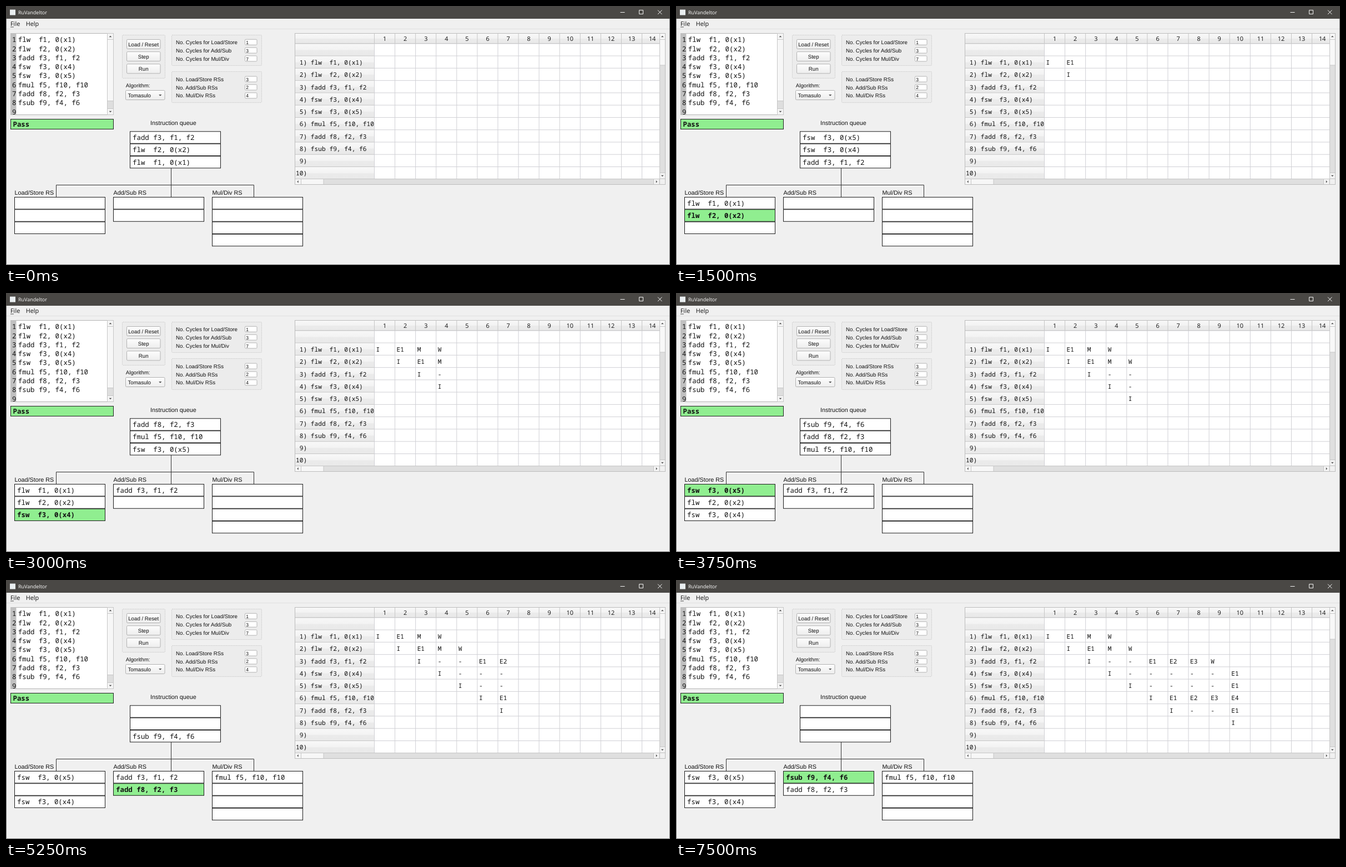
Animation of 1196x468 px, one loop 8000 ms. Source, as an HTML page:

```html
<!DOCTYPE html>
<html lang="en">
<head>
<meta charset="utf-8">
<title>Pipeline simulator</title>
<style>
  html, body { margin: 0; width: 100%; height: 100%; overflow: hidden; background: #f0f0f0; }
  svg { display: block; width: 1196px; height: 468px; }
  text { white-space: pre; text-rendering: geometricPrecision; fill: #111; }
  .mono { font-family: "Noto Sans Mono", "DejaVu Sans Mono", monospace; font-size: 12.38px; }
  .cell { font-family: "Noto Sans Mono", "DejaVu Sans Mono", monospace; font-size: 11.2px; }
  .ui { font-family: "Liberation Sans", Arial, sans-serif; font-size: 9.7px; }
  .label { font-family: "Liberation Sans", Arial, sans-serif; font-size: 10.8px; }
  .menu { font-family: "Open Sans", "Noto Sans", sans-serif; font-size: 10.9px; }
  .title { font-family: "Open Sans", "Noto Sans", sans-serif; font-size: 9px; fill: #fff; }
  .bold { font-weight: 700; }
  .mid { text-anchor: middle; }
</style>
</head>
<body>
<svg id="stage" viewBox="0 0 1196 468" xmlns="http://www.w3.org/2000/svg">
  <defs>
    <linearGradient id="raised" x1="0" y1="0" x2="0" y2="1">
      <stop offset="0" stop-color="#fdfdfd"/><stop offset="1" stop-color="#ededed"/>
    </linearGradient>
    <linearGradient id="head" x1="0" y1="0" x2="0" y2="1">
      <stop offset="0" stop-color="#f8f8f8"/><stop offset=".5" stop-color="#f3f3f3"/>
      <stop offset=".55" stop-color="#ebebeb"/><stop offset="1" stop-color="#e9e9e9"/>
    </linearGradient>
    <clipPath id="codeClip"><rect x="8" y="49" width="174" height="147"/></clipPath>
    <clipPath id="rowClip"><rect x="520" y="49" width="143" height="263"/></clipPath>
  </defs>
  <g id="base"></g>
  <g id="live"></g>
</svg>
<script>
const STEP = 750, LOOP = 8000, LAST = 10;
const PITCH = 22.27, COL = 37.08;
const GREEN = '#90ee90';

const program = [
  'flw  f1, 0(x1)', 'flw  f2, 0(x2)', 'fadd f3, f1, f2', 'fsw  f3, 0(x4)',
  'fsw  f3, 0(x5)', 'fmul f5, f10, f10', 'fadd f8, f2, f3', 'fsub f9, f4, f6'
];

// Issue cycle, station, slot and the stages that follow, per instruction
const runs = [
  { at: 1, rs: 0, slot: 0, stages: 'I E1 M W' },
  { at: 2, rs: 0, slot: 1, stages: 'I E1 M W' },
  { at: 3, rs: 1, slot: 0, stages: 'I - - E1 E2 E3 W' },
  { at: 4, rs: 0, slot: 2, stages: 'I - - - - - E1' },
  { at: 5, rs: 0, slot: 0, stages: 'I - - - - E1' },
  { at: 6, rs: 2, slot: 0, stages: 'I E1 E2 E3 E4' },
  { at: 7, rs: 1, slot: 1, stages: 'I - - E1' },
  { at: 10, rs: 1, slot: 0, stages: 'I' }
].map(r => ({ ...r, stages: r.stages.split(' ') }));

const stations = [
  { name: 'Load/Store RS', x: 15.5, size: 3 },
  { name: 'Add/Sub RS', x: 193.5, size: 2 },
  { name: 'Mul/Div RS', x: 371.5, size: 4 }
];

const rect = (x, y, w, h, fill, stroke = 'none', extra = '') =>
  `<rect x="${x}" y="${y}" width="${w}" height="${h}" fill="${fill}" stroke="${stroke}" ${extra}/>`;
const path = (d, stroke, extra = '') => `<path d="${d}" fill="none" stroke="${stroke}" ${extra}/>`;
const text = (x, y, cls, s) => `<text x="${x}" y="${y}" class="${cls}">${s}</text>`;

function arrow(x, y, dir, r = 2.4) {
  return `<path d="M${-r} ${r / 2}L0 ${-r / 2}L${r} ${r / 2}z" fill="#505050"
    transform="translate(${x} ${y}) rotate(${dir * 90})"/>`;
}

function windowFrame() {
  return rect(0, 0, 1196, 468, '#f0f0f0') +
    rect(0, 0, 1196, 23, '#4a4845') +
    path('M.5 23V467.5H1195.5V23', '#6b6b6b') +
    rect(7, 6.5, 10, 10, '#e9eef0') +
    text(22, 14.8, 'title', 'RuVandeltor') +
    path('M1106.5 11.5H1114.5M1140.5 7.5H1147.5V14.5H1140.5zM1174 7.5L1181.5 15M1181.5 7.5L1174 15', '#f4f4f4') +
    text(8, 36.3, 'menu', 'File') + text(35.7, 36.3, 'menu', 'Help') +
    path('M8 38H14', '#222', 'stroke-width=".8"') +
    path('M1 41.5H1195', '#e0e0e0');
}

function editor() {
  let s = rect(8.5, 49.5, 185, 147, '#fff', '#b4b4b4') + rect(8, 49, 10.5, 147.5, '#c0c0c0');
  s += '<g clip-path="url(#codeClip)">';
  for (let i = 0; i < 9; i++) {
    const y = 65.4 + i * 16.27;
    s += text(10.9, y, 'mono', i + 1) + text(21.8, y, 'mono', program[i] || '');
  }
  return s + '</g>' +
    rect(182.5, 49.5, 11, 147, '#f4f4f4', '#c6c6c6') +
    rect(182.5, 60.5, 11, 111, '#f7f7f7', '#c6c6c6') +
    rect(183, 172, 10, 13.5, '#dedede') + path('M182.5 185.5H193.5', '#c6c6c6') +
    arrow(188, 55, 0) + arrow(188, 191, 2) +
    rect(8.5, 204.5, 185, 18, GREEN, '#222') + text(12.5, 218.1, 'mono bold', 'Pass');
}

function controls() {
  const group = (x, y, w, h) => rect(x, y, w, h, '#ececec', '#cfcfcf', 'rx="1.5" stroke-dasharray="2 1"');
  let s = group(209.5, 52.5, 77, 78) + group(298.5, 52.5, 162, 55) + group(298.5, 118.5, 162, 56);
  ['Load / Reset', 'Step', 'Run'].forEach((name, i) => {
    const y = 60.5 + i * 22.2;
    s += rect(217.5, y, 60.5, 17, 'url(#raised)', '#b2b2b2', 'rx="1.8"') +
      text(247.7, y + 12.2, 'ui mid', name);
  });
  s += text(215.8, 147.3, 'ui', 'Algorithm:') +
    rect(215.5, 152.5, 70.5, 17, 'url(#raised)', '#b2b2b2', 'rx="1.8"') +
    text(219.5, 164.9, 'ui', 'Tomasulo') + arrow(277.8, 161.3, 2, 2.7);
  const field = (y, name, value) => text(306, y, 'ui', name) +
    rect(430.5, y - 8.6, 21.5, 10, '#fff', '#b4b4b4', 'rx="1.6"') +
    `<text x="432.3" y="${y - .1}" class="ui" style="font-size:8.6px">${value}</text>`;
  [['Load/Store', 1, 3], ['Add/Sub', 3, 2], ['Mul/Div', 7, 4]].forEach(([unit, cycles, size], i) => {
    s += field(68.9 + i * 14.85, `No. Cycles for ${unit}`, cycles) +
      field(135.7 + i * 14.85, `No. ${unit} RSs`, size);
  });
  return s;
}

function diagram() {
  return text(260, 215, 'label', 'Instruction queue') +
    path('M297.5 293V345M90.5 345V323.5H446.5V345', '#333') +
    stations.map(st => text(st.x, 340.7, 'label', st.name)).join('');
}

function table() {
  const left = 663.5, right = 1177, top = 67.8, bottom = 312;
  let s = rect(520, 49, 667, 273, '#f0f0f0') + rect(left, top, right - left, bottom - top, '#fff') +
    rect(520, 49, 657, top - 49, 'url(#head)');
  let grid = '', heads = '';
  for (let c = 0; c < 14; c++) {
    const x = left + c * COL;
    grid += `M${x} ${top}V${bottom}`;
    heads += `M${x} 49V${top}`;
    s += text(x + 18.6, 63.4, 'menu mid', c + 1);
  }
  s += '<g clip-path="url(#rowClip)">';
  for (let r = 0; r < 11; r++) {
    const y = top + r * PITCH;
    s += rect(520, y, 143.5, PITCH, 'url(#head)');
    grid += `M${left} ${y}H${right}`;
    heads += `M520 ${y}H${left}`;
    if (r) s += text(522, y + 15.9, 'cell', `${r})`.padStart(3) + ' ' + (program[r - 1] || ''));
  }
  s += '</g>' + path(grid, '#d0d0d5') + path(heads, '#c6c6c6') + path(`M520 ${top}H${right}`, '#c6c6c6');
  return s +
    rect(1177.5, 49.5, 10, 262.5, '#dfdfdf', '#c6c6c6') +
    rect(1177.5, 49.5, 10, 57.5, '#f7f7f7', '#c6c6c6') + path('M1177.5 60.5H1187.5', '#c6c6c6') +
    rect(1177.5, 301.5, 10, 10.5, '#f4f4f4', '#c6c6c6') +
    arrow(1182.3, 55, 0) + arrow(1182.3, 307, 2) +
    rect(520.5, 312.5, 657, 10, '#dfdfdf', '#c6c6c6') +
    rect(520.5, 312.5, 51.5, 10, '#f7f7f7', '#c6c6c6') + path('M531.5 312.5V322.5', '#c6c6c6') +
    rect(1166.5, 312.5, 10.5, 10, '#f4f4f4', '#c6c6c6') +
    arrow(525.5, 317.4, 3) + arrow(1172, 317.4, 1) +
    rect(520.5, 49.5, 667, 273, 'none', '#bcbcbc');
}

function box(x, y, label = '', lit = false) {
  return rect(x, y, 163, 21.5, lit ? GREEN : '#fff', '#1c1c1c') +
    text(x + 4.6, y + 15.3, lit ? 'mono bold' : 'mono', label);
}

function scene(cycle) {
  const head = runs.filter(r => r.at <= cycle).length;
  let s = '';
  for (let i = 0; i < 3; i++) s += box(223.5, 226.8 + i * PITCH, program[head + 2 - i]);

  stations.forEach((st, rs) => {
    for (let slot = 0; slot < st.size; slot++) {
      // A slot stays taken through its write-back cycle
      const i = runs.findIndex(r => r.rs === rs && r.slot === slot && r.at <= cycle &&
        (r.stages.at(-1) !== 'W' || cycle < r.at + r.stages.length));
      s += box(st.x, 345.5 + slot * PITCH, program[i], i >= 0 && runs[i].at === cycle);
    }
  });

  runs.forEach((r, row) => r.stages.forEach((stage, k) => {
    const c = r.at + k;
    if (c <= cycle) s += text(666.5 + (c - 1) * COL, 105.97 + row * PITCH, 'cell', stage);
  }));
  return s;
}

const live = document.getElementById('live');
document.getElementById('base').innerHTML = windowFrame() + editor() + controls() + diagram() + table();

let shown = -1;
function draw(ms) {
  const cycle = Math.min(LAST, Math.floor((ms % LOOP) / STEP));
  if (cycle !== shown) live.innerHTML = scene(shown = cycle);
}

let start = null;
function tick(now) {
  start ??= now;
  draw(now - start);
  requestAnimationFrame(tick);
}
draw(0);
requestAnimationFrame(tick);
</script>
</body>
</html>
```
